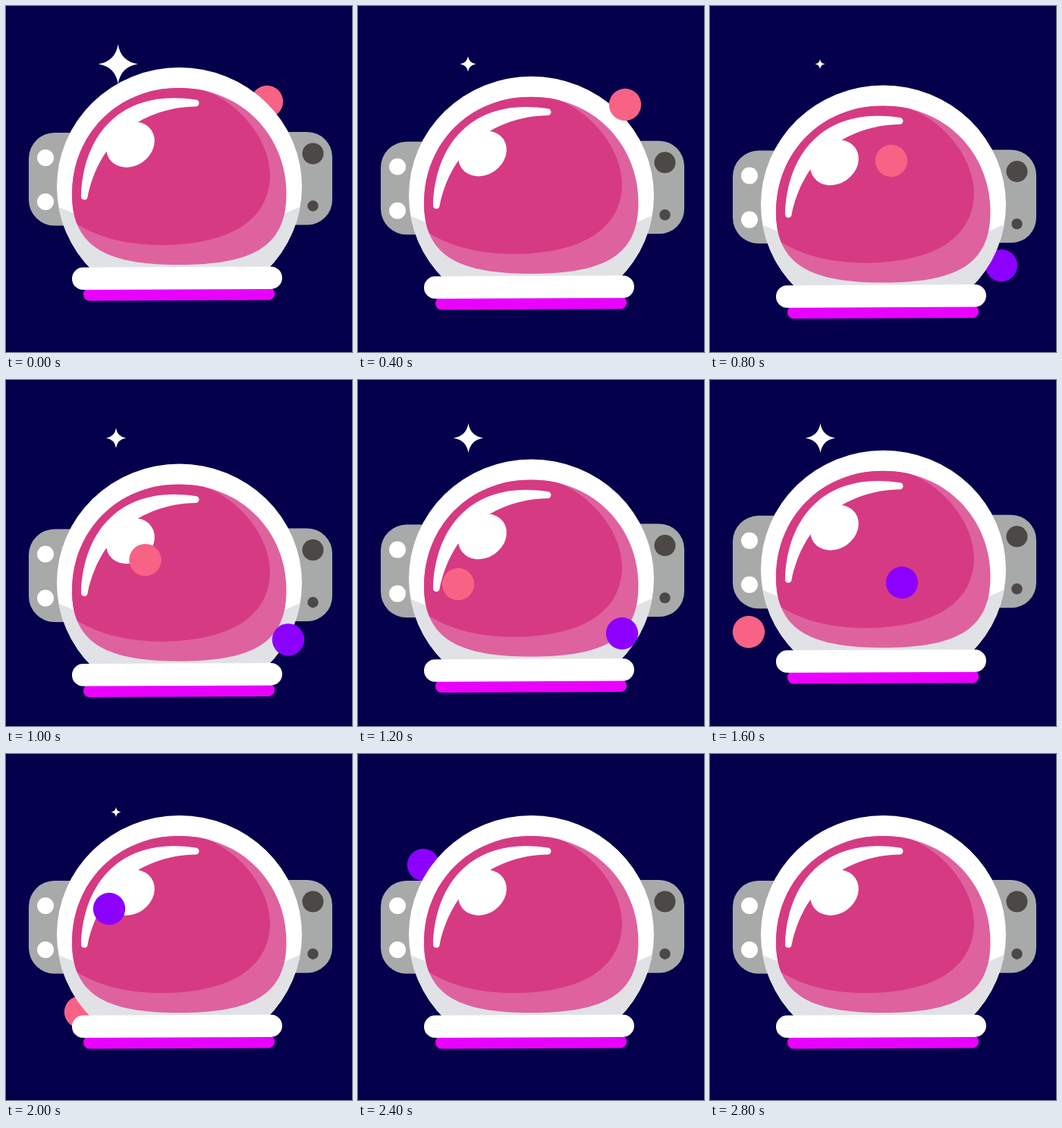
Recreate the animation shown at these times as an HTML page. Size 456 px wide and 456 px high, loop 3000 ms.

```html
<!DOCTYPE html>
<html lang="en">
<head>
<meta charset="utf-8">
<title>Space helmet</title>
<style>
  html, body { margin: 0; width: 100%; height: 100%; overflow: hidden; background: #05004b; }
  svg { display: block; width: 100%; height: 100%; }
</style>
</head>
<body>
<svg viewBox="0 0 456 456">
  <defs>
    <clipPath id="shell"><path d="M60 70H400V352H60Z"/></clipPath>
    <clipPath id="dome"><ellipse cx="228.5" cy="238" rx="161.5" ry="157"/></clipPath>
    <path id="glass" d="M228 108C310 108 369.5 170 369.5 248C369.5 320 320 341 228 341C136 341 87 320 87 248C87 170 146 108 228 108Z"/>
    <clipPath id="visor"><use href="#glass"/></clipPath>
  </defs>

  <path id="star" fill="#fff" d="M0-1Q.14-.14 1 0Q.14 .14 0 1Q-.14 .14-1 0Q-.14-.14 0-1Z"/>
  <g id="back"></g>

  <g id="helmet">
    <g fill="#a8a9a9">
      <rect x="30" y="167" width="100" height="122.5" rx="34"/>
      <rect x="330" y="166" width="100" height="122.5" rx="33"/>
    </g>
    <g fill="#fff">
      <circle cx="52" cy="200" r="11"/>
      <circle cx="52" cy="258" r="11"/>
    </g>
    <g fill="#4b4846">
      <circle cx="404.5" cy="194.5" r="14"/>
      <circle cx="404.5" cy="263.5" r="7.2"/>
    </g>

    <g clip-path="url(#shell)">
      <g clip-path="url(#dome)">
        <path fill="#fff" d="M60 70H400V400H60Z"/>
        <path fill="#e1e2e6" d="M60 261L100 278H357L400 259V400H60Z"/>
      </g>
    </g>

    <use href="#glass" fill="#de629e"/>
    <path clip-path="url(#visor)" fill="#d63a83" d="M250 108C298 118 347 170 348 222C348 285 290 315 205 315C160 315 125 306 94 288L60 270V90H250Z"/>

    <g fill="#fff">
      <path d="M99 251C101 172 150 108 250 123.5A4.5 4.5 0 0 1 250 132.5C175 134 122 180 107.5 252A4.3 4.3 0 0 1 99 251Z"/>
      <ellipse cx="164" cy="182.7" rx="33.6" ry="28" transform="rotate(-35 164 182.7)"/>
    </g>

    <g transform="rotate(-.25 228 366)">
      <rect x="102" y="371" width="252" height="17" rx="8" fill="#ea00ff"/>
      <rect x="87" y="344" width="277" height="29.5" rx="14.7" fill="#fff"/>
    </g>
  </g>

  <g id="front"></g>
  <circle id="pink" r="21.2" fill="#f76285"/>
  <circle id="purple" r="21.2" fill="#8c00ff"/>
</svg>

<script>
const STEP = 200, STEPS = 15;
const get = id => document.getElementById(id);

// Key points lie two steps apart, joined by a smooth curve.
const orbits = {
  pink: { start: 0, keys: [[344, 126], [352, 130], [239, 204], [132, 269], [51, 332], [98, 340]] },
  purple: { start: 4, keys: [[384, 342], [348, 334], [253, 267], [136, 204], [86, 146]] }
};

// Catmull-Rom curve with the end points repeated.
function pointOnCurve(keys, position) {
  const last = keys.length - 1;
  const i = Math.min(Math.floor(position), last - 1), t = position - i;
  const key = n => keys[Math.max(0, Math.min(last, n))];
  return [0, 1].map(axis => {
    const [a, b, c, d] = [i - 1, i, i + 1, i + 2].map(n => key(n)[axis]);
    return b + t / 2 * (c - a + t * (2 * a - 5 * b + 4 * c - d + t * (3 * (b - c) + d - a)));
  });
}

function drawBall(id, step) {
  const { start, keys } = orbits[id];
  const position = (step - start) / 2, last = keys.length - 1;
  const visible = position >= 0 && position <= last, ball = get(id);
  ball.style.display = visible ? "" : "none";
  if (!visible) return;
  const [x, y] = pointOnCurve(keys, position);
  ball.setAttribute("transform", `translate(${x} ${y})`);
  get(position > 0 && position < last ? "front" : "back").append(ball);
}

function drawStar(step) {
  const fade = 1 - (step / 3) ** 1.25;
  const pulse = 1 - Math.abs(step - 7) / 4;
  const size = Math.max(0, fade, pulse);
  const x = 145 + 2.7 * size ** 6;
  get("star").setAttribute("transform", `translate(${x} 76.5) scale(${26 * size})`);
}

function drawHelmet(step) {
  const bob = Math.max(5 - Math.abs(step - 5), 1 - Math.abs(step - 13));
  get("helmet").setAttribute("transform", `translate(0 ${5.9 * bob})`);
}

let shown = -1;
function tick() {
  const step = Math.floor(performance.now() / STEP) % STEPS;
  if (step !== shown) {
    shown = step;
    drawStar(step);
    drawHelmet(step);
    Object.keys(orbits).forEach(id => drawBall(id, step));
  }
  requestAnimationFrame(tick);
}
tick();
</script>
</body>
</html>
```
